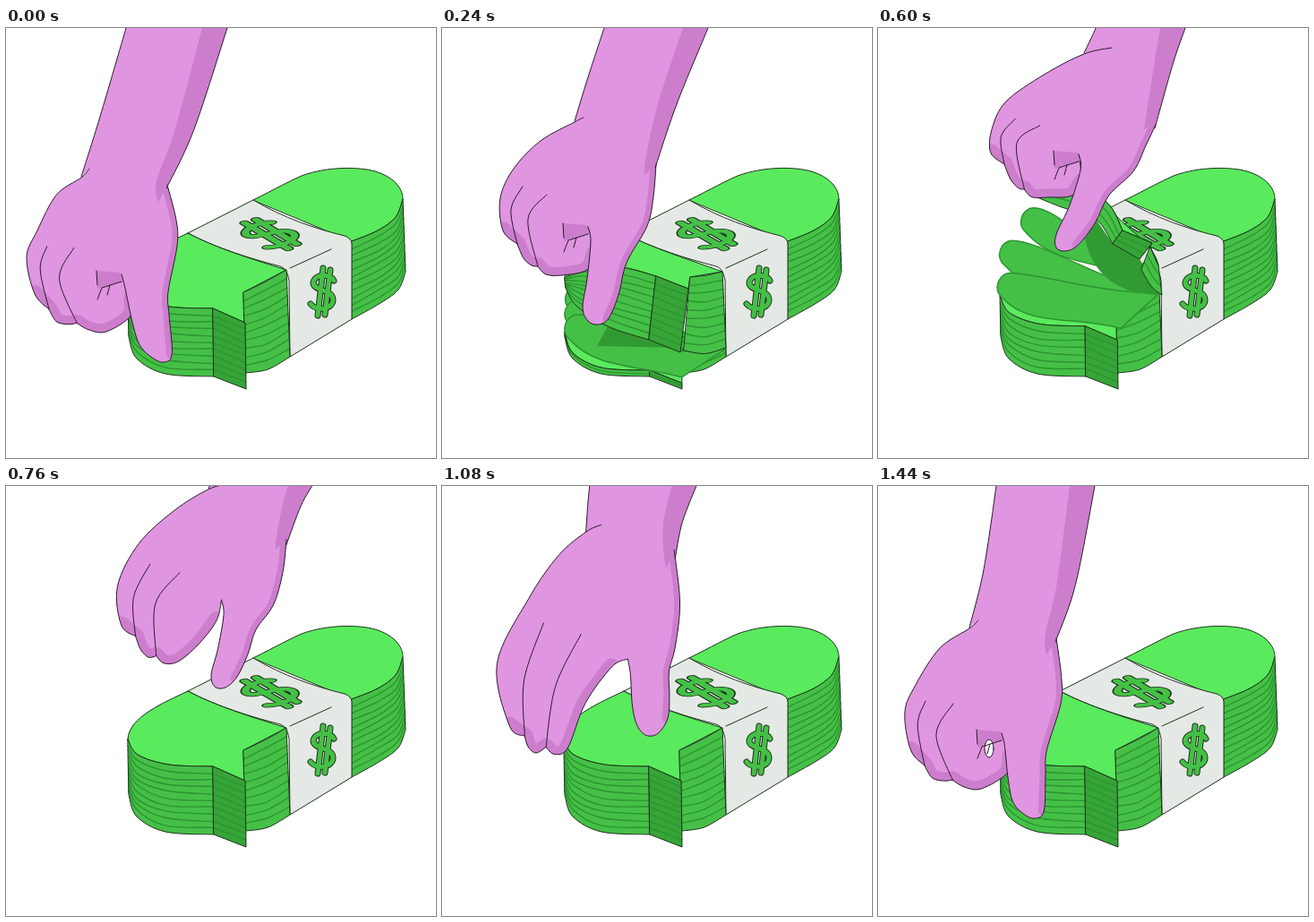
Recreate the animation shown at these times as an HTML page. Size 480 by 480 pixels, loop 1480 ms.

```html
<!DOCTYPE html>
<html lang="en">
<head>
<meta charset="utf-8">
<title>Counting cash</title>
<style>
html, body { margin: 0; width: 100%; height: 100%; overflow: hidden; background: #fff; }
svg { display: block; width: 100vw; height: 100vh; }
</style>
</head>
<body>
<svg id="stage" viewBox="0 0 480 480" fill="none" stroke-linejoin="round" stroke-linecap="round"></svg>
<script>
const LOOP = 1480, STEP = 40, LAND = 720;
const LIGHT = '#5aea5d', MID = '#45c046', DARK = '#36a437', RULE = '#2c9431', INK = '#1c331c';
const SKIN = '#e095e0', SHADE = '#cc7ecd', LINE = '#2a1a2a', PAPER = '#e5e9e5';

const mix = (a, b, k) => a + (b - a) * k;
const mixAll = (a, b, k) => a.map((v, i) => mix(v, b[i], k));
const mixPts = (a, b, k) => a.map((p, i) => mixAll(p, b[i], k));
const pts = list => Array.from({ length: list.length / 2 }, (_, i) => [list[2 * i], list[2 * i + 1]]);
const xy = p => p[0].toFixed(2) + ' ' + p[1].toFixed(2) + ' ';
const add = (p, x, y) => [p[0] + x, p[1] + y];

// Hand outline: arm, back of hand, two fingertips, palm edge, thumb, wrist, finger creases
const pinch = [
  181,0, 163,55, 148,104,
  158,100, 148,105, 110,126, 80,157, 65,190, 68,226, 84,241,
  91,257, 100,265, 107,266,
  116,275, 134,276, 162,270, 170,252, 163,222,
  166,238, 162,280, 157,312, 163,327, 174,331, 186,324, 197,298, 206,262, 229,221, 236,188, 239,152,
  238,156, 262,85, 297,0,
  90,177, 77,203, 117,186, 96,213];
const spread = [
  140,0, 131,55, 126,107,
  143,99, 126,107, 95,133, 62,180, 28,250, 41,317, 58,329,
  62,341, 71,348, 82,342,
  92,350, 107,343, 127,296, 155,257, 171,247,
  174,264, 176,300, 181,322, 191,333, 204,331, 215,314, 217,288, 217,262, 225,232, 230,185, 224,128,
  225,137, 232,70, 248,0,
  78,207, 57,268, 119,219, 91,275];

// Moves the handle points to the given places; the rest follow the nearest handles
const handles = [0, 2, 3, 6, 9, 14, 17, 22, 24, 26, 28, 31];
function bend(places) {
  const base = pts(pinch), goal = pts(places);
  return base.flatMap(p => {
    let sum = 0, dx = 0, dy = 0;
    handles.forEach((h, i) => {
      const q = base[h], w = 1 / (Math.hypot(p[0] - q[0], p[1] - q[1]) ** 2.5 + 0.01);
      sum += w;
      dx += w * (goal[i][0] - q[0]);
      dy += w * (goal[i][1] - q[1]);
    });
    return add(p, dx / sum, dy / sum);
  });
}
const press = bend([134,0, 84,166, 93,157, 35,226, 48,314, 112,339, 129,275, 177,373, 182,320, 191,243, 180,175, 247,0]);
const lift = bend([205,0, 185,72, 210,62, 105,130, 108,201, 158,237, 189,187, 188,294, 214,262, 251,198, 271,140, 317,0]);
const high = bend([238,-5, 230,28, 261,22, 143,82, 141,152, 190,189, 224,141, 209,249, 242,218, 285,160, 310,108, 343,0]);
const grip = bend([132,0, 102,158, 112,150, 42,222, 52,312, 115,338, 138,276, 176,371, 187,322, 204,243, 199,170, 242,0]);
const hover = spread.map((v, i) => v + (i % 2 ? -107 : 70));
hover.splice(60, 4, 306, 15, 325, -8);
const handTimes = [0, 240, 400, 600, 960, 1200, 1440];
const hands = [press, pinch, lift, high, hover, spread, grip];

// Lifted notes: front edge (4 points), outer and inner notch, band corner; the same below;
// then the back corner and two band controls
const topEdge = [136,283, 147,300, 182,311, 231,313, 267,329, 265,295, 313,270];
const baseEdge = [137,345, 146,369, 178,386, 232,389, 268,403, 268,385, 317,367];
const bandEdge = [203,229, 235,246, 275,258];
const whole = topEdge.concat(baseEdge, bandEdge);
const flat = topEdge.concat(topEdge, bandEdge);
const raised = [137,279, 160,268, 200,267, 239,277, 275,291, 277,278, 313,272,
  138,290, 150,310, 185,333, 231,348, 266,362, 270,360, 317,357].concat(bandEdge);
const curled = [150,228, 190,218, 224,232, 251,260, 284,262, 284,262, 313,270,
  146,238, 155,258, 195,270, 235,302, 266,312, 268,314, 317,333, 225,215, 245,245, 278,258];
const folded = [180,178, 220,178, 256,195, 273,226, 306,240, 304,244, 313,265,
  180,190, 205,200, 243,213, 262,241, 292,258, 294,270, 317,298, 252,192, 270,222, 308,238];
const blockTimes = [0, 240, 400, 600, LAND];
const blocks = [whole, raised, curled, folded, flat];

// Smooth interpolation through timed poses
function poseAt(times, poses, t, loop) {
  const n = times.length;
  const idx = i => loop ? (i + n) % n : Math.max(0, Math.min(n - 1, i));
  const when = i => loop ? times[idx(i)] + LOOP * Math.floor(i / n) : times[idx(i)];
  let i = n - 1;
  while (i > 0 && times[i] > t) i--;
  const t0 = when(i), h = when(i + 1) - t0, s = h ? (t - t0) / h : 0;
  const slope = (j, c) => {
    if (!loop && (j <= 0 || j >= n - 1)) return 0;
    const ha = when(j) - when(j - 1), hb = when(j + 1) - when(j);
    const v = poses[idx(j)][c];
    const sa = (v - poses[idx(j - 1)][c]) / ha, sb = (poses[idx(j + 1)][c] - v) / hb;
    return 0.75 * (sa * hb + sb * ha) / (ha + hb);
  };
  const next = poses[idx(i + 1)], s2 = s * s, s3 = s2 * s;
  return poses[i].map((v, c) =>
    v + (next[c] - v) * (3 * s2 - 2 * s3) +
    h * ((s3 - 2 * s2 + s) * slope(i, c) + (s3 - s2) * slope(i + 1, c)));
}

function curve(p) {
  let d = '';
  for (let i = 0; i < p.length - 1; i++) {
    const a = p[Math.max(0, i - 1)], b = p[i], c = p[i + 1], e = p[Math.min(p.length - 1, i + 2)];
    d += 'C' + xy(add(b, (c[0] - a[0]) / 6, (c[1] - a[1]) / 6)) +
      xy(add(c, (b[0] - e[0]) / 6, (b[1] - e[1]) / 6)) + xy(c);
  }
  return d;
}
const open = p => 'M' + xy(p[0]) + curve(p);
const join = runs => runs.map((p, i) => (i ? 'L' : 'M') + xy(p[0]) + curve(p)).join('') + 'Z';
const path = (d, fill, stroke, width = 1) =>
  `<path d="${d}" fill="${fill || 'none'}"` + (stroke ? ` stroke="${stroke}" stroke-width="${width}"` : '') + '/>';

// Ruled face between two edges; rules are spaced over the visible share
function face(top, base, fill, share, full = 10) {
  const n = Math.max(2, Math.round(full * share));
  let rules = '';
  for (let i = 1; i < n; i++) {
    rules += open(mixPts(top, base, i / n).map((p, k) => add(p, 0, Math.sin(k * 2.3 + i * 1.7) * 0.8)));
  }
  const d = join([top, base.slice().reverse()]);
  return path(d, fill) + path(rules, '', RULE, 1.4) + path(d, '', INK);
}

function frontFaces(top, base, share) {
  const bow = (a, b, y) => [a, add(mixAll(a, b, 0.5), 0, y), b];
  return face(bow(top[5], top[6], 1), bow(base[5], base[6], 5), MID, share) +
    face(top.slice(0, 4), base.slice(0, 4), MID, share) +
    face([top[3], top[4]], [base[3], base[4]], DARK, share);
}

const dollarPath = 'M13 -13C9 -21 -8 -21 -10 -11C-11 -1 13 -4 12 9C11 20 -7 21 -13 13M1 -27L-5 26M9 -25L3 25';
const dollar = m => `<g transform="matrix(${m})">` +
  path(dollarPath, '', INK, 7) + path(dollarPath, '', MID, 5) + '</g>';

function farEnd() {
  const top = pts([386,238, 415,226, 435,211, 443,191]);
  const base = pts([386,325, 418,307, 438,292, 446,272]);
  const lid = 'M276 192C300 180 318 170 330 165C360 154 395 155 412 160C432 166 443 178 443 191' +
    curve(top.slice().reverse()) + 'Z';
  return path(lid, LIGHT, INK) + face(top, base, MID, 1, 11);
}

const band = path('M203 229L276 192C310 212 345 224 378 232Q386 235 386 241L386 325L317 367' +
  'L316 282Q314 268 306 266C275 258 235 246 203 229Z', PAPER, INK) +
  path('M317 268L363 247', '', INK) +
  dollar('1 0 0 1 353 295') + dollar('1.3 -.58 1.08 .48 294 231');
const backdrop = farEnd() + band;

function pileShare(t) {
  const ts = [40, 240, 400, 600, LAND], hs = [0, 0.09, 0.34, 0.74, 1];
  if (t <= ts[0]) return 0;
  for (let i = 1; i < ts.length; i++) {
    if (t <= ts[i]) return mix(hs[i - 1], hs[i], (t - ts[i - 1]) / (ts[i] - ts[i - 1]));
  }
  return 1;
}

function leaf(q, block, pile) {
  const sag = Math.max(0, block[7][0] - 137) * 0.5;
  const tip = add(mixAll(block[7], pile[0], q), -sag * Math.sin(Math.PI * q), 0);
  const root = mixAll(block[13], pile[6], q), notch = mixAll(block[11], pile[4], q);
  const over = add(tip, 14, -10), under = add(tip, 6, 18);
  const d = 'M' + xy(root) +
    'C' + xy(add(mixAll(root, over, 0.4), 0, 10)) + xy(add(over, 32, 0)) + xy(over) +
    'C' + xy(add(over, -12, 0)) + xy(add(under, -12, -10)) + xy(under) +
    'C' + xy(add(under, 28, 32)) + xy(add(notch, -50, -14)) + xy(notch) + 'Z';
  return path(d, MID, RULE, 1.5);
}

function lid(b) {
  const d = open(b.slice(0, 4)) + b.slice(4, 7).map(p => 'L' + xy(p)).join('') +
    'C' + xy(b[16]) + xy(b[15]) + xy(b[14]) +
    'C' + xy(add(b[14], -25, 12)) + xy(add(b[0], 0, -25)) + xy(b[0]) + 'Z';
  return path(d, LIGHT, INK);
}

function money(t) {
  const rest = pts(whole);
  if (t === 0 || t >= LAND) return lid(rest) + frontFaces(rest.slice(0, 7), rest.slice(7, 14), 1);
  const share = pileShare(t), base = rest.slice(7, 14);
  const pile = mixPts(rest.slice(0, 7), base, 1 - share);
  const b = pts(poseAt(blockTimes, blocks, t, false));
  let out = '';
  if (share > 0) {
    out += path(open(pile.slice(0, 4)) + pile.slice(4).map(p => 'L' + xy(p)).join('') +
      'Q' + xy([200, pile[0][1] - 25]) + xy(pile[0]) + 'Z', LIGHT, INK);
    out += frontFaces(pile, base, share);
  }
  out += [0, 1, 2].map(k => (t / 210 + k / 3) % 1).sort((m, n) => m - n)
    .map(q => leaf(q, b, pile)).join('');
  out += path('M' + xy(b[9]) + [b[10], b[11], b[13]].map(p => 'L' + xy(p)).join('') +
    'Q' + xy([245, b[13][1]]) + xy(add(b[9], -12, 22)) + 'Z', '#319a32');
  return out + lid(b) + frontFaces(b.slice(0, 7), b.slice(7, 14), 1 - share);
}

function hand(t) {
  const p = pts(poseAt(handTimes, hands, t, true));
  const cut = (a, b) => p.slice(a, b + 1);
  const runs = [cut(0, 2), cut(3, 9), cut(9, 12), cut(12, 17), cut(17, 28), cut(29, 31)];
  const thumb = join([runs[4]]), body = join(runs);
  const armShade = join([[p[27], p[28], p[29], p[30], p[31]],
    [add(p[31], -28, 0), add(p[30], -21, 0), add(p[29], -12, 0), add(p[27], -7, 0)]]);
  const fingerEdge = open(cut(8, 9)) + open(runs[2]) + open(cut(12, 16));
  const creases = open([p[32], p[33], p[9]]) + open([p[34], p[35], p[12]]);
  let out = `<clipPath id="skin"><path d="${body}"/></clipPath><clipPath id="thumb"><path d="${thumb}"/></clipPath>` +
    path(body, SKIN) +
    `<g clip-path="url(#skin)">${path(armShade, SHADE)}${path(fingerEdge, '', SHADE, 19)}</g>` +
    runs.slice(0, 4).map(r => path(open(r), '', LINE)).join('') + path(creases, '', LINE);
  if (t < 680 || t > 1380) {
    out += `<g transform="translate(${xy(p[17])})">` +
      path('M-28 -4L-2 -2L2 7L-22 15L-27 16Z', SHADE) +
      (t >= 1400 ? '<ellipse cx="-14" cy="17" rx="5" ry="10" fill="#fff" stroke="' + LINE + '"/>' : '') +
      path('M0 8L-22 15L-27 28M-13 12L-16 23M-28 -4L-27 12', '', LINE) + '</g>';
  }
  return out + path(thumb, SKIN) +
    `<g clip-path="url(#thumb)">${path(open(cut(23, 28)), '', SHADE, 13)}</g>` +
    path(open(runs[4]), '', LINE) + path(open(runs[5]), '', LINE);
}

const stage = document.getElementById('stage');
let start = null, shown = -1;
function draw(now) {
  if (start === null) start = now;
  const t = Math.floor(((now - start) % LOOP) / STEP) * STEP;
  if (t !== shown) {
    stage.innerHTML = backdrop + money(t) + hand(t);
    shown = t;
  }
  requestAnimationFrame(draw);
}
requestAnimationFrame(draw);
</script>
</body>
</html>
```
